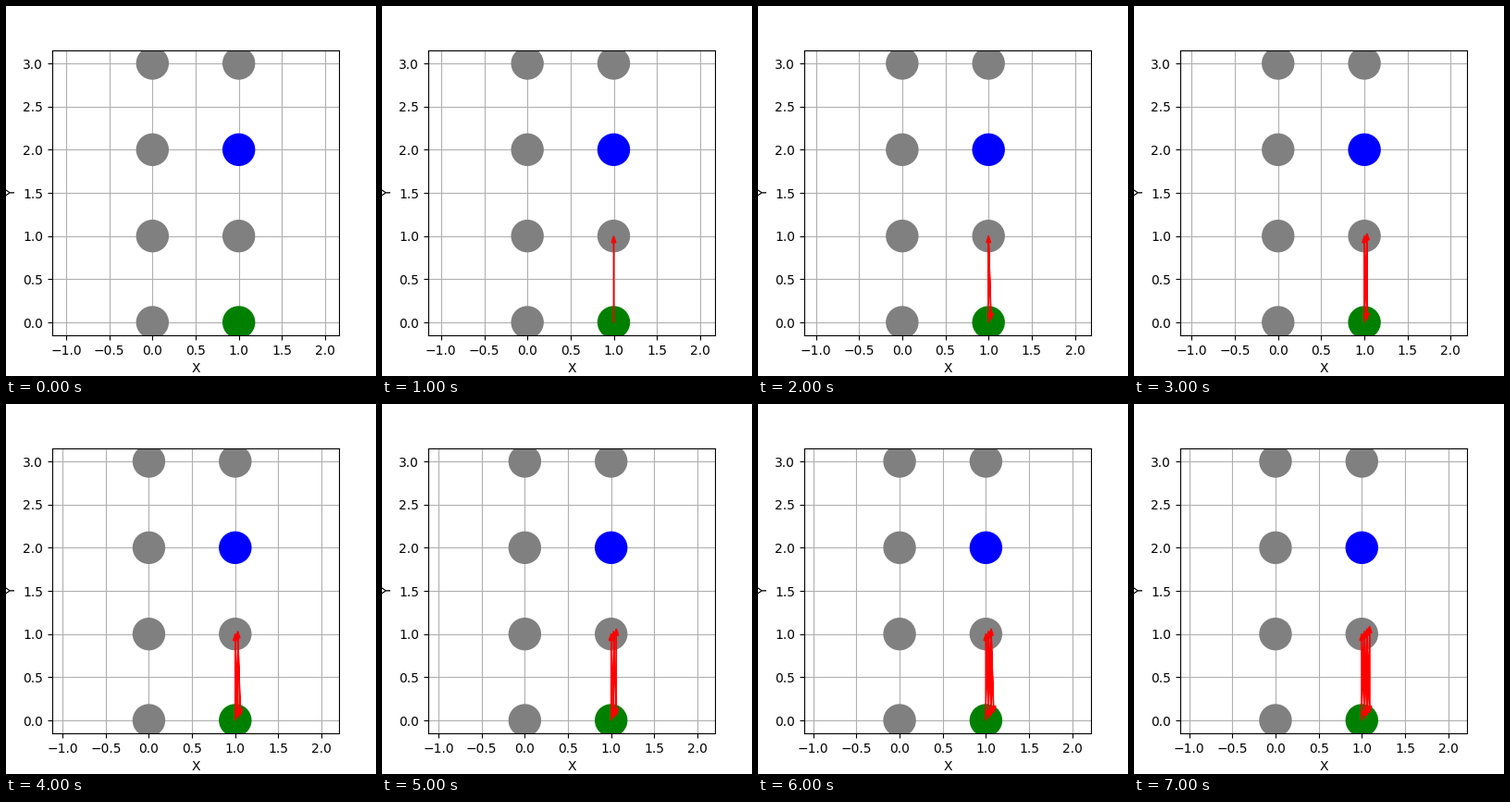
A matplotlib script for the animation above (8 s loop, 400 by 400 pixels).

```python
import matplotlib.pyplot as plt
from matplotlib.animation import FuncAnimation
from matplotlib.ticker import MultipleLocator

STEPS = 8          # one new arrow per step, the first step has none
OFFSET = 0.03      # diagonal shift for each repeated visit
Y_LIM = (-0.15, 3.15)

NODES = [(x, y) for x in (0, 1) for y in range(4)]
COLORS = {(1, 0): "green", (1, 2): "blue"}

fig, ax = plt.subplots(figsize=(4, 4), dpi=100)


def stop(k):
    """Place reached after k moves between (1, 0) and (1, 1)."""
    shift = OFFSET * (k // 2)
    return 1 + shift, k % 2 + shift


def draw_arrow(k):
    (x0, y0), (x1, y1) = stop(k), stop(k + 1)
    ax.arrow(x0, y0, x1 - x0, y1 - y0, head_width=0.05,
             length_includes_head=True, color="red")


def fit_view():
    """Equal scale on both axes, centred on the data in x."""
    box = ax.get_window_extent()
    half = (Y_LIM[1] - Y_LIM[0]) * box.width / box.height / 2
    mid = sum(ax.dataLim.intervalx) / 2
    ax.set_xlim(mid - half, mid + half)
    ax.set_ylim(*Y_LIM)


def update(step):
    ax.clear()
    xs, ys = zip(*NODES)
    ax.scatter(xs, ys, s=600, c=[COLORS.get(n, "gray") for n in NODES])
    for k in range(step):
        draw_arrow(k)
    fit_view()
    for axis in (ax.xaxis, ax.yaxis):
        axis.set_major_locator(MultipleLocator(0.5))
    ax.set_axisbelow(True)
    ax.grid(True)
    ax.set_xlabel("X")
    ax.set_ylabel("Y")
    return []


anim = FuncAnimation(fig, update, frames=STEPS, interval=1000,
                     init_func=lambda: update(0), repeat=True)
plt.show()
```
